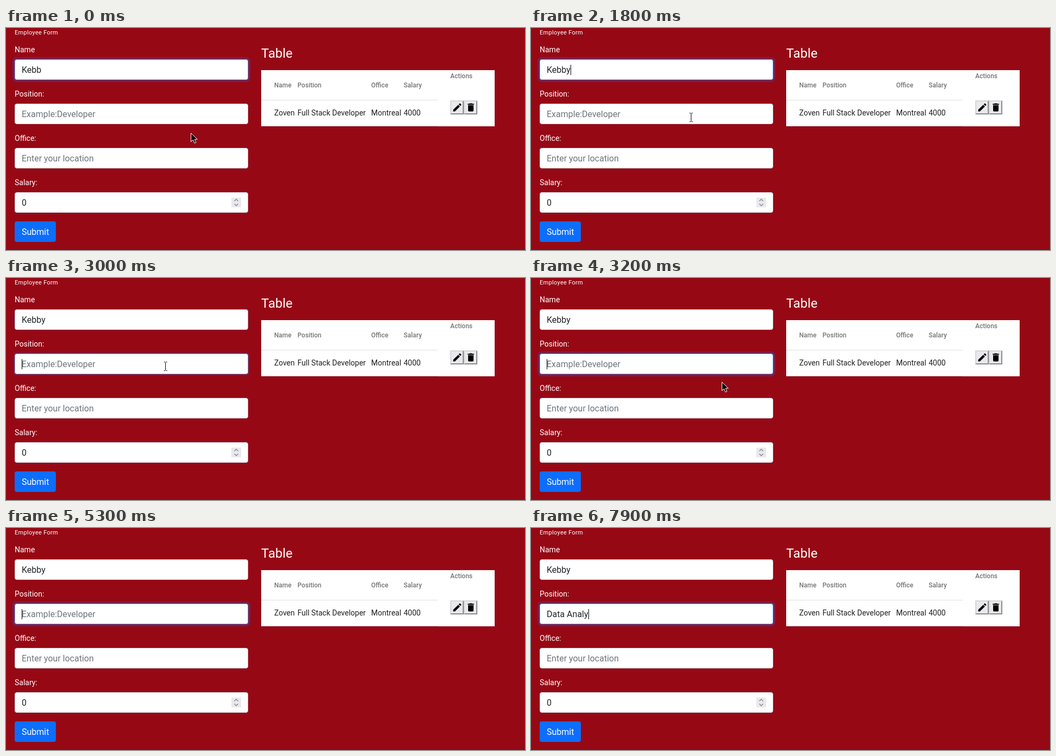
Recreate the animation shown at these times as an HTML page. Size 958 by 411 pixels, loop 8 s.

```html
<!DOCTYPE html>
<html lang="en">
<head>
<meta charset="utf-8">
<title>Employee Form</title>
<style>
  html, body { margin: 0; width: 100%; height: 100%; overflow: hidden; background: #970815; }
  svg { display: block; width: 958px; height: 411px; font-family: Roboto, sans-serif; }
  text { white-space: pre; }
  .label { font-size: 14px; fill: #fff; }
  .value { font-size: 16px; fill: #212529; }
  .hint { font-size: 16px; fill: #6c757d; }
  .head { font-size: 12px; font-weight: 500; fill: #757575; }
  .cell { font-size: 14px; fill: #212121; }
</style>
</head>
<body>
<svg id="stage" viewBox="0 0 958 411">
  <rect width="958" height="411" fill="#970815"/>
  <text x="16" y="12" font-size="11" letter-spacing=".3" fill="#fff">Employee Form</text>
  <g id="form"></g>

  <rect x="416" y="314" width="18" height="18" fill="#e9e9ed"/>
  <path d="M421.5 320.5l3.5-3.5 3.5 3.5M421.5 325.5l3.5 3.5 3.5-3.5" fill="none" stroke="#84848c" stroke-width="1.4"/>
  <rect x="16" y="358" width="76" height="38" rx="4" fill="#0d6efd"/>
  <text x="29" y="383" font-size="16" fill="#fff">Submit</text>

  <text x="471" y="55" font-size="24" fill="#fff">Table</text>
  <rect x="471" y="78" width="431" height="104" fill="#fff"/>
  <path d="M471 133.5H797M471 181.5H797" stroke="#e0e0e0"/>
  <g id="table"></g>
  <g id="buttons"></g>

  <rect id="caret" width="1" height="19" fill="#000"/>
  <path id="arrow" d="M.5 .8V16.5L4.3 13L6.9 19.2L9.7 18L7.1 12.1H12.2Z" fill="#000" stroke="#fff"/>
  <path id="beam" d="M-3-8H-1L0-7L1-8H3M0-7V7M-3 8H-1L0 7L1 8H3" fill="none" stroke="#000"/>
</svg>
<script>
const LOOP = 8000, STEP = 100;
const $ = id => document.getElementById(id);

function add(parent, tag, attrs, text = '') {
  const el = document.createElementNS('http://www.w3.org/2000/svg', tag);
  for (const key in attrs) el.setAttribute(key, attrs[key]);
  el.textContent = text;
  return parent.appendChild(el);
}

function makeField(y, label, value, hint) {
  const form = $('form');
  add(form, 'text', { class: 'label', x: 16, y: y - 13 }, label);
  const ring = add(form, 'rect', { fill: '#0d6efd' });
  const box = { x: 16.5, y: y + .5, width: 430, height: 37, rx: 3.5 };
  add(form, 'rect', { ...box, fill: '#fff', stroke: '#ced4da' });
  const border = add(form, 'rect', { ...box, fill: 'none', stroke: '#86b7fe' });
  const text = add(form, 'text', { x: 29, y: y + 25 });

  const field = {
    y,
    setText(value) {
      text.textContent = value || hint;
      text.setAttribute('class', value ? 'value' : 'hint');
      field.caretX = Math.round(29 + (value ? text.getComputedTextLength() : 0));
    },
    setFocus(amount) {
      const spread = 4 * amount;
      const ringBox = {
        x: 16 - spread, y: y - spread, width: 431 + 2 * spread, height: 38 + 2 * spread,
        rx: 4 + spread, opacity: .25 * amount
      };
      for (const key in ringBox) ring.setAttribute(key, ringBox[key]);
      border.setAttribute('opacity', amount);
    }
  };
  field.setText(value);
  field.setFocus(0);
  return field;
}

const nameField = makeField(58, 'Name', '');
const positionField = makeField(140, 'Position:', '', 'Example:Developer');
makeField(222, 'Office:', '', 'Enter your location');
makeField(304, 'Salary:', '0');

const columns = [[495, 'Name', 'Zoven'], [538, 'Position', 'Full Stack Developer'],
  [674, 'Office', 'Montreal'], [734, 'Salary', '4000']];
for (const [x, head, cell] of columns) {
  add($('table'), 'text', { class: 'head', x, y: 110 }, head);
  add($('table'), 'text', { class: 'cell', x, y: 162 }, cell);
}
add($('table'), 'text', { class: 'head', x: 820, y: 93 }, 'Actions');

const icons = [
  'M3 17.25V21h3.75L17.81 9.94l-3.75-3.75zM20.7 7a1 1 0 0 0 0-1.4L18.4 3.3a1 1 0 0 0-1.4 0L15.1 5.1l3.75 3.75z',
  'M6 19a2 2 0 0 0 2 2h8a2 2 0 0 0 2-2V7H6zM19 4h-3.5l-1-1h-5l-1 1H5v2h14z'
];
icons.forEach((d, i) => {
  const button = add($('buttons'), 'g', { transform: `translate(${820 + 25 * i} 134)` });
  add(button, 'rect', { width: 25, height: 26, fill: '#e9e9ed' });
  add(button, 'path', { d: 'M0 26V0H25L23 2H2V24Z', fill: '#d6d6d8' });
  add(button, 'path', { d: 'M0 26H25V0L23 2V24H2Z', fill: '#8c8c8e' });
  add(button, 'path', { d, transform: 'translate(3 3) scale(.8333)' });
});

// Each track lists [start time, value...]; a value holds until the next one.
const names = [[0, 'Kebb'], [600, 'Kebby']];
const positions = [[0, ''], [5700, 'D'], [5900, 'Da'], [6500, 'Dat'], [6600, 'Data'], [6900, 'Data '],
  [7300, 'Data A'], [7500, 'Data An'], [7600, 'Data Ana'], [7700, 'Data Anal'], [7900, 'Data Analy']];
const carets = [[0, false], [1600, true], [4100, false], [5300, true], [6500, false], [6600, true],
  [7700, false], [7900, true]];
const focusShift = [[0, 0], [3000, .7], [3100, 1]];
const pointer = [[0, 341, 194], [1400, 335, 194], [1500, 324, 190], [1600, 309, 180], [1700, 300, 170],
  [1800, 295, 165], [1900, 294, 163], [3100, 312, 171], [3200, 352, 192], [3300, 377, 207],
  [4300, 428, 208], [4400, -50, -50]];

const at = (track, t) => track.findLast(([start]) => start <= t).slice(1);

function draw(now) {
  const t = Math.floor(now % LOOP / STEP) * STEP;
  nameField.setText(at(names, t)[0]);
  positionField.setText(at(positions, t)[0]);

  const [shift] = at(focusShift, t);
  nameField.setFocus(1 - shift);
  positionField.setFocus(shift);

  const active = t < 2900 ? nameField : positionField;
  $('caret').setAttribute('x', active.caretX);
  $('caret').setAttribute('y', active.y + 10);
  $('caret').setAttribute('opacity', at(carets, t)[0] ? 1 : 0);

  const [x, y] = at(pointer, t);
  const overInput = y >= 140 && y < 178;
  $('arrow').setAttribute('transform', `translate(${x} ${y})`);
  $('arrow').setAttribute('opacity', overInput ? 0 : 1);
  $('beam').setAttribute('transform', `translate(${x + .5} ${y + .5})`);
  $('beam').setAttribute('opacity', overInput ? 1 : 0);
}

const start = performance.now();
function tick() {
  draw(performance.now() - start);
  requestAnimationFrame(tick);
}
tick();
</script>
</body>
</html>
```
